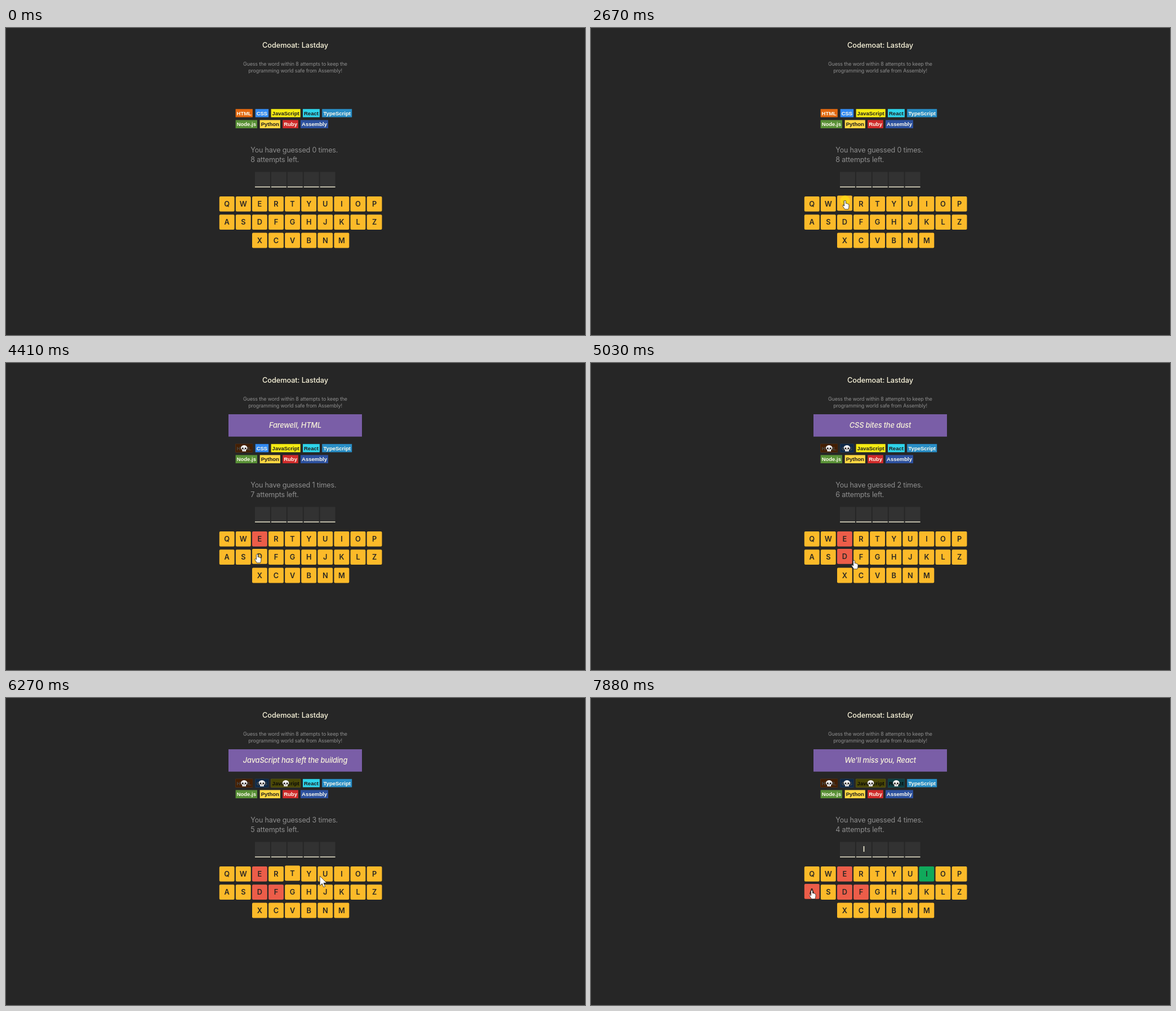
An HTML page that plays this animation: 1028x545 px, repeating every 8 s.

```html
<!DOCTYPE html>
<html lang="en">
<head>
<meta charset="utf-8">
<title>Word game</title>
<style>
  html, body { margin: 0; width: 100%; height: 100%; overflow: hidden; background: #262626; }
  svg { display: block; width: 100%; height: 100%; font-family: Inter, sans-serif; }
  .muted { fill: #8e8e8e; }
  .cream { fill: #f9f4da; }
  .mid { text-anchor: middle; }
  .title { font-size: 12.8px; font-weight: 500; letter-spacing: -.1px; }
  .intro { font-size: 8.95px; letter-spacing: -.14px; }
  .status { font-size: 12.6px; letter-spacing: -.2px; }
  .farewell { font-size: 12.9px; font-style: italic; font-weight: 500; letter-spacing: -.2px; }
  .tag { font: bold 9.5px "Liberation Sans", sans-serif; }
  .key { font-size: 12.8px; font-weight: 600; fill: #2a2723; }
</style>
</head>
<body>
<svg id="stage" viewBox="0 0 1028 545"></svg>
<script>
const LOOP = 8000, LAG = 60, WORD_LETTER = "I";
const stage = document.getElementById("stage");

function add(parent, name, attrs = {}, text = "") {
  const el = document.createElementNS("http://www.w3.org/2000/svg", name);
  for (const k in attrs) el.setAttribute(k, attrs[k]);
  el.textContent = text;
  parent.appendChild(el);
  return el;
}
const label = (parent, x, y, cls, text) => add(parent, "text", { x, y, class: cls }, text);
const box = (parent, x, y, width, height, fill, rx = 0) =>
  add(parent, "rect", { x, y, width, height, fill, rx });
const show = (el, on) => el.setAttribute("visibility", on ? "visible" : "hidden");

// Heading
box(stage, 0, 0, 1028, 545, "#262626");
label(stage, 513.5, 34.5, "title cream mid", "Codemoat: Lastday");
label(stage, 513.5, 66.8, "intro muted mid", "Guess the word within 8 attempts to keep the");
label(stage, 513.5, 79, "intro muted mid", "programming world safe from Assembly!");

const banner = add(stage, "g");
box(banner, 395, 91, 237, 39.7, "#7a5ea7");
const farewell = label(banner, 513.5, 114.7, "farewell cream mid", "");

// Language tags: name, x, width, row, fill, dark text
const tags = [
  ["HTML", 407.6, 30.3, 0, "#e2680f"],
  ["CSS", 442.7, 23.5, 0, "#328af1"],
  ["JavaScript", 470.6, 52.1, 0, "#f4eb13", 1],
  ["React", 527, 29.9, 0, "#2ed3e9", 1],
  ["TypeScript", 561.2, 53, 0, "#298ec6"],
  ["Node.js", 407.6, 38.4, 1, "#599137"],
  ["Python", 450.7, 36.2, 1, "#ffd742", 1],
  ["Ruby", 491.2, 27.7, 1, "#d02b2b"],
  ["Assembly", 523, 49, 1, "#2d519f"]
].map(([name, x, w, row, fill, dark]) => {
  const y = 143.8 + row * 19.6;
  box(stage, x, y, w, 14.6, fill);
  label(stage, x + w / 2, y + 10.8, "tag mid", name).setAttribute("fill", dark ? "#1e1e1e" : "#fbf8ea");
  const veil = add(stage, "g");
  box(veil, x, y, w, 14.6, "rgba(0,0,0,.7)");
  const skull = add(veil, "g", { transform: `translate(${x + w / 2} ${y + 7.8})` });
  add(skull, "path", {
    d: "M-5.7-.6C-5.7-7.2 5.7-7.2 5.7-.6Q5.7 2 3.3 2.5V5.4H-3.3V2.5Q-5.7 2-5.7-.6Z", fill: "#f4f4f4"
  });
  for (const s of [-1, 1]) add(skull, "circle", { cx: s * 2.5, cy: 0, r: 1.6, fill: "#2b2420" });
  add(skull, "path", { d: "M0 1.3L1 3H-1ZM-1.2 4V5.4M1.2 4V5.4", fill: "#2b2420", stroke: "#777", "stroke-width": .4 });
  return veil;
});

const guessed = label(stage, 434.3, 220.5, "status muted", "");
const left = label(stage, 434.3, 238, "status muted", "");

// Word slots
for (let i = 0; i < 5; i++) {
  const x = 442 + i * 28.9;
  box(stage, x, 255.5, 27, 26.2, "#323232");
  box(stage, x, 281.5, 27, 1.4, "#f9f4da");
}
const found = label(stage, 484.4, 273, "key mid", WORD_LETTER);
found.style.fill = "#f9f4da";

// Keyboard
const KEY = 26.8, STEP = 29.1;
const keys = [];
["QWERTYUIOP", "ASDFGHJKLZ", "XCVBNM"].forEach((row, r) => [...row].forEach((name, i) => {
  const x = 378.8 + (i + (r === 2 ? 2 : 0)) * STEP, y = 299 + r * 32.3;
  const g = add(stage, "g");
  const face = box(g, x, y, KEY, KEY, "#fcba29", 2);
  label(g, x + KEY / 2, y + 18.1, "key mid", name);
  keys.push({ name, x, y, g, face });
}));

// Pointer
const flash = add(stage, "circle", { fill: "#ffdd14", opacity: .78 });
const arrow = add(stage, "path", {
  d: "M0 0V17.3L4 13.5L6.6 19.7L9.3 18.6L6.7 12.4H12Z", fill: "#fff", stroke: "#111", "stroke-width": .7
});
const hand = add(stage, "path", {
  d: "M-1.4 1.2Q0-.9 1.4 1.2V5.4Q3 4.8 3.8 6Q5.1 5.5 5.6 6.8Q7 6.5 7 8.2V11Q7 13 5.8 15.8H-.4" +
     "Q-1.6 13.5-3.8 10.6Q-4.6 9-3.4 8.6Q-2.2 8.8-1.4 10Z",
  fill: "#fff", stroke: "#222", "stroke-width": .8
});

const easeOut = p => 1 - (1 - p) ** 2;
const cubicOut = p => 1 - (1 - p) ** 3;
const easeInOut = p => p * p * (3 - 2 * p);
const linear = p => p;

// Pointer moves: start, last change, steps, destination, easing, bend
const START = [1004, 474];
const moves = [
  [990, 1470, 8, [697, 368], easeOut],
  [1750, 2540, 13, [451, 306], easeInOut],
  [2820, 3000, 3, [447, 314], easeOut],
  [3350, 3390, 2, [445, 316], linear],
  [4050, 4680, 10, [459, 347], easeInOut, [434, 338]],
  [4960, 5030, 2, [467, 350], linear],
  [5100, 5430, 6, [480, 341], easeOut],
  [5680, 6210, 9, [515, 316], easeInOut],
  [6270, 6420, 3, [575, 316], cubicOut],
  [6490, 6690, 4, [594, 314], easeOut],
  [7050, 7690, 11, [392, 341], easeInOut, [480, 365]]
];

// Clicks: press, response, letter
const clicks = [
  [2610, 2820, "E"], [4820, 4890, "D"], [5490, 5560, "F"], [6830, 6900, "I"], [7750, 7880, "A"]
];
const farewells = ["Farewell, HTML", "CSS bites the dust", "JavaScript has left the building", "We'll miss you, React"];

function pointer(t) {
  let from = START;
  for (const [t0, t1, n, to, ease, bend] of moves) {
    if (t < t0) break;
    const k = Math.min(n - 1, Math.floor((t - t0) / (t1 - t0) * (n - 1) + 1e-6));
    const p = ease((k + 1) / n), q = 1 - p, a = from;
    from = to.map((v, i) => bend
      ? q * q * a[i] + 2 * q * p * bend[i] + p * p * v
      : q * a[i] + p * v);
  }
  return from;
}

function keyAt([x, y]) {
  return keys.find(k => x >= k.x && x <= k.x + KEY && y >= k.y && y <= k.y + KEY);
}

function draw(t) {
  const done = clicks.filter(c => t >= c[1]).map(c => c[2]);
  const wrong = done.filter(c => c !== WORD_LETTER).length;
  const missed = done.length && done[done.length - 1] !== WORD_LETTER;

  show(banner, done.length);
  farewell.textContent = missed ? farewells[wrong - 1] : "";
  tags.forEach((veil, i) => show(veil, i < wrong));
  guessed.textContent = `You have guessed ${wrong} times.`;
  left.textContent = `${8 - wrong} attempts left.`;
  show(found, done.includes(WORD_LETTER));

  const pos = pointer(t), before = pointer(t - LAG);
  const hover = t >= 990 && keyAt(before);
  for (const k of keys) {
    k.face.setAttribute("fill", !done.includes(k.name) ? "#fcba29" : k.name === WORD_LETTER ? "#10a95b" : "#ec5d49");
    k.g.setAttribute("transform", `translate(0 ${k === hover ? -1.4 : 0})`);
  }

  // A fast pointer keeps the arrow shape
  const fast = Math.hypot(pos[0] - before[0], pos[1] - before[1]) > 20;
  const pointing = Boolean(hover) && !fast;
  show(arrow, t >= 990 && !pointing);
  show(hand, t >= 990 && pointing);
  for (const el of [arrow, hand, flash]) el.setAttribute("transform", `translate(${pos[0]} ${pos[1]})`);

  const press = clicks.find(c => t >= c[0] && t < c[1]);
  show(flash, press);
  if (press) flash.setAttribute("r", t - press[0] < 55 ? 6.5 : 8.5);
}

let start;
function tick(now) {
  start ??= now;
  draw((now - start) % LOOP);
  requestAnimationFrame(tick);
}
draw(0);
requestAnimationFrame(tick);
</script>
</body>
</html>
```
